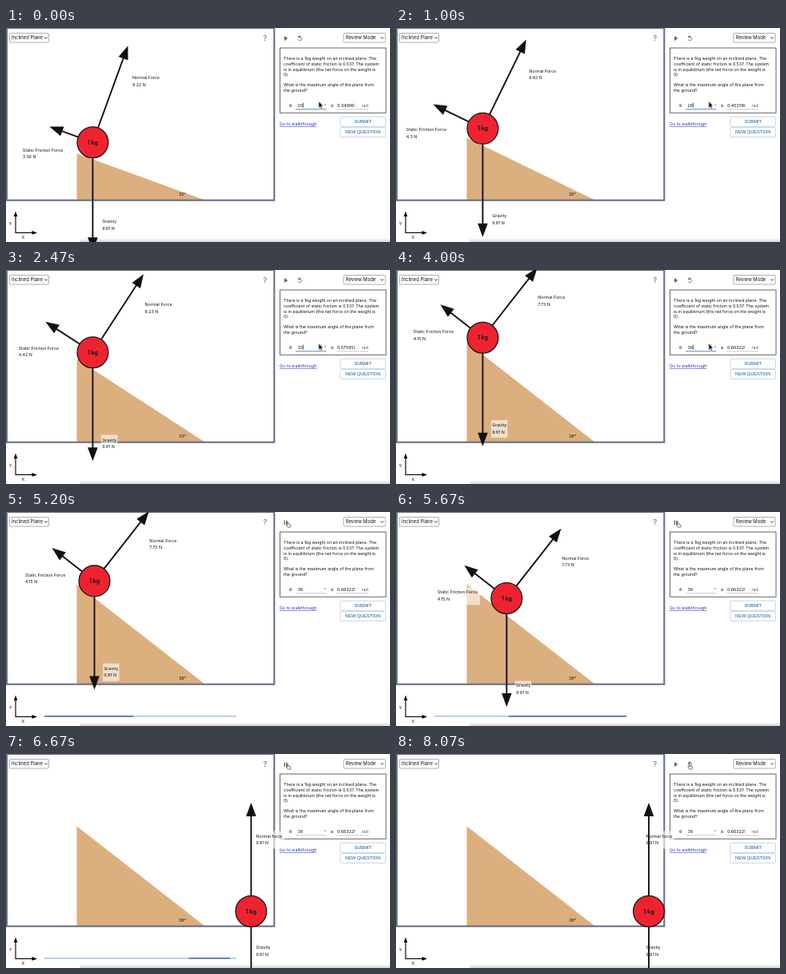
An HTML page for the animation above (8.27 s loop, 480 by 268 pixels).

```html
<!DOCTYPE html>
<html lang="en">
<head>
<meta charset="utf-8">
<title>Inclined plane</title>
<style>
  html, body { margin: 0; width: 100%; height: 100%; overflow: hidden; background: #fff; }
  svg { display: block; width: 100vw; height: 100vh; }
  text { font-family: Inter, "Liberation Sans", sans-serif; font-size: 5.35px; fill: #111; white-space: pre; }
  .question text { font-size: 5.28px; }
  .select text { font-size: 5.9px; }
  .button text { font-family: "Liberation Sans", Arial, sans-serif; fill: #3676b8; font-size: 5.65px;
    text-anchor: middle; stroke: #3676b8; stroke-width: .12px; }
  .button rect { fill: #fff; stroke: #b1c6dc; stroke-width: .7px; }
</style>
</head>
<body>
<svg id="stage" viewBox="0 0 480 268" preserveAspectRatio="none">
  <defs>
    <linearGradient id="shade" x1="0" y1="0" x2="0" y2="1">
      <stop offset="0" stop-color="#fff"/><stop offset="1" stop-color="#c8c8c8"/>
    </linearGradient>
    <clipPath id="radClip"><rect x="413" y="90" width="23.3" height="12"/></clipPath>
    <clipPath id="trackClip"><rect x="48" y="255" width="240" height="1.7"/></clipPath>
  </defs>
  <rect width="480" height="268" fill="#fff"/>
  <rect x="92" y="263" width="400" height="6.5" rx="4" fill="url(#shade)"/>
  <path id="ramp" fill="#dcaf7e"/>
  <rect x="1" y="0" width="334.3" height="215.7" fill="none" stroke="#657089" stroke-width="2.1"/>
  <text id="angle" x="216" y="210"></text>

  <g class="select" fill="#fff" stroke="#777" stroke-width=".6">
    <rect x="4.2" y="6.5" width="49.3" height="11.5" rx="1.5"/>
    <rect x="422" y="6.5" width="52.3" height="11.5" rx="1.5"/>
    <path d="M48 11.4l1.8 1.8 1.8-1.8M468.5 11.4l1.8 1.8 1.8-1.8" fill="none" stroke="#222" stroke-width=".9"/>
    <text x="7" y="14.4" stroke="none">Inclined Plane</text>
    <text x="424.8" y="14.4" stroke="none">Review Mode</text>
  </g>
  <text x="321.4" y="16.2" style="font-size:9px;fill:#4c586e">?</text>

  <path id="play" d="M348 10v6l4.3-3z" fill="#666"/>
  <path id="pause" d="M347.6 10.5h1.2v5.4h-1.2zM350.2 10.5h1.2v5.4h-1.2z" fill="#555"/>
  <g id="reset">
    <path d="M365.2 11.6a2.5 2.5 0 1 1-.3 2.6" fill="none" stroke="#666" stroke-width=".8"/>
    <path d="M367.6 9.1v4l-2.6-2z" fill="#666"/>
  </g>

  <g class="question">
    <rect x="342.5" y="25" width="132.5" height="81.3" fill="#fff" stroke="#555" stroke-width=".9"/>
    <text x="347" y="39.6">There is a 1kg weight on an inclined plane. The</text>
    <text x="347" y="46.6">coefficient of static friction is 0.537. The system</text>
    <text x="347" y="53.5">is in equilibrium (the net force on the weight is</text>
    <text x="347" y="60.4">0).</text>
    <text x="347" y="73">What is the maximum angle of the plane from</text>
    <text x="347" y="80">the ground?</text>
  </g>
  <text x="354" y="98.5">θ</text>
  <text id="degrees" x="364.5" y="98.5"></text>
  <path id="caret" d="M371.5 93.5v6.2" stroke="#111" stroke-width=".6"/>
  <path id="underline" d="M362 101.8h38.5"/>
  <g id="spinner">
    <rect x="389.5" y="92.5" width="5.5" height="8" rx="1" fill="#dcdcdc"/>
    <path d="M390.8 95.7l1.4-1.8 1.4 1.8zM390.8 97.5l1.4 1.8 1.4-1.8z" fill="#444"/>
  </g>
  <text x="398" y="98.5" style="fill:#555">°</text>
  <text x="406" y="98.5">≈</text>
  <text id="radians" x="414" y="98.5" clip-path="url(#radClip)"></text>
  <path d="M413 101.8h40" stroke="#999" stroke-width=".5"/>
  <text x="444.5" y="98.5" style="fill:#555">rad</text>

  <text x="342" y="122" style="fill:#2a2ad4;text-decoration:underline;text-decoration-thickness:.4px">Go to walkthrough</text>
  <g class="button">
    <rect x="418" y="111.3" width="56.5" height="12" rx="1.5"/>
    <rect x="418" y="124.5" width="56.5" height="12" rx="1.5"/>
    <text x="446.2" y="119.2">SUBMIT</text>
    <text x="446.2" y="132.4">NEW QUESTION</text>
  </g>

  <g stroke="#111" stroke-width="1.2">
    <path d="M12 233v23.4h22" fill="none"/>
    <path d="M12 229.5l2.3 6.5h-4.6zM39 256.4l-6.5 2.3v-4.6z" stroke="none"/>
    <text x="3.8" y="247" stroke="none">Y</text>
    <text x="19.6" y="263.5" stroke="none">X</text>
  </g>

  <g id="progress" clip-path="url(#trackClip)">
    <rect x="48" y="255" width="240" height="1.7" fill="#a9c3e3"/>
    <rect id="bar1" y="255" height="1.7" fill="#3c6cae"/>
    <rect id="bar2" y="255" height="1.7" fill="#3c6cae"/>
  </g>

  <g id="labels"></g>
  <g id="arrows"></g>
  <g id="ball">
    <circle r="19.4" fill="#ef2330" stroke="#151515" stroke-width="1.3"/>
    <text y="2.6" text-anchor="middle" style="font-size:7.2px;font-weight:600">1 kg</text>
  </g>

  <path id="pointer" d="M0 0v7.6l1.8-1.6 1.3 2.8 1.3-.6-1.3-2.7h2.4z" fill="#111" stroke="#fff" stroke-width=".5"/>
  <path id="hand" d="M0 .5q.6-.9 1.2 0v2.6l2.6.6q.9.3.7 1.2l-.5 2.2h-3.1l-1.9-2.4q.1-.8 1-.3z" fill="#fff" stroke="#222" stroke-width=".6"/>
</svg>
<script>
const LOOP = 8270, G = 9.81, MU = 0.537;
const PLAY = 4935, SLIDE = 5030, STOP = 7200;
const RAMP = { left: 88.5, right: 248.5, base: 215.5 };
const START_X = 108.4, FLOOR_Y = 197, WALL_X = 316;
const ACCEL = 72.8, FLOOR_SPEED = 230;
const clicks = [130, 270, 400, 530, 670, 800, 1070, 1270, 1470, 1670,
  1870, 2000, 2200, 2530, 2800, 3070, 3400, 3600];
const cursorPath = [[0, 391, 92.3], [4070, 391, 92.3], [4750, 351.5, 12],
  [7260, 351.5, 12], [7800, 366, 12], [LOOP, 366, 12]];

const $ = id => document.getElementById(id);
const set = (el, attrs) => { for (const k in attrs) el.setAttribute(k, attrs[k]); };
const show = (el, on) => el.setAttribute('visibility', on ? 'visible' : 'hidden');
function add(parent, tag, attrs = {}) {
  const el = document.createElementNS('http://www.w3.org/2000/svg', tag);
  set(el, attrs);
  return parent.appendChild(el);
}

function makeForce(boxWidth) {
  const shaft = add($('arrows'), 'path', { stroke: '#111', 'stroke-width': 1.9 });
  const head = add($('arrows'), 'path', { d: 'M0 0l-17 6.3v-12.6z', fill: '#111' });
  const label = add($('labels'), 'g');
  add(label, 'rect', { x: -1.3, y: -6, width: boxWidth, height: 22, rx: 1, fill: '#fff', 'fill-opacity': .6 });
  const name = add(label, 'text', { y: 2 });
  const value = add(label, 'text', { y: 10.5 });
  return { shaft, head, label, name, value };
}
const normal = makeForce(37), friction = makeForce(54.5), gravity = makeForce(20.5);

// Direction is in degrees, clockwise from the right.
function drawForce(f, x, y, title, newtons, dir, place) {
  const len = 16.8 + 12.15 * newtons, a = dir * Math.PI / 180;
  const dx = len * Math.cos(a), dy = len * Math.sin(a);
  set(f.shaft, { d: `M${x} ${y}l${dx * (1 - 12 / len)} ${dy * (1 - 12 / len)}` });
  set(f.head, { transform: `translate(${x + dx} ${y + dy}) rotate(${dir})` });
  const [lx, ly] = place(dx, dy);
  set(f.label, { transform: `translate(${Math.min(x + lx, 312.5)} ${Math.min(y + ly, 242)})` });
  f.name.textContent = title;
  f.value.textContent = +newtons.toFixed(2) + ' N';
}

function bezier(x1, y1, x2, y2) {
  const at = (p, q, s) => 3 * (1 - s) ** 2 * s * p + 3 * (1 - s) * s * s * q + s ** 3;
  return x => {
    if (x <= 0 || x >= 1) return Math.max(0, Math.min(1, x));
    let lo = 0, hi = 1;
    for (let i = 0; i < 24; i++) {
      const mid = (lo + hi) / 2;
      if (at(x1, x2, mid) < x) lo = mid; else hi = mid;
    }
    return at(y1, y2, lo);
  };
}
const ease1 = bezier(.65, .815, .735, .395), ease2 = bezier(.165, .84, .44, 1);

function drawBar(el, ms, ease, left, right) {
  const k = ms < 0 ? 0 : ease((ms % 2100) / 1260);
  const mix = ([a, b]) => 2.4 * (a + (b - a) * k);
  const from = mix(left), to = 240 - mix(right);
  set(el, { x: 48 + from, width: Math.max(0, to - from) });
}

function ballAt(t, tan) {
  const y0 = 194.2 - (RAMP.right - START_X) * tan;
  const s = Math.max(0, t - SLIDE) / 1000;
  const drop = (FLOOR_Y - y0) / tan;
  const landing = Math.sqrt(drop / ACCEL);
  if (s < landing) {
    const dx = ACCEL * s * s;
    return { x: START_X + dx, y: y0 + dx * tan, floor: false };
  }
  const x = START_X + drop + FLOOR_SPEED * (s - landing);
  return { x: Math.min(WALL_X, x), y: FLOOR_Y, floor: true };
}

function drawCursor(t) {
  const i = cursorPath.findIndex(p => p[0] > t);
  const [t0, x0, y0] = cursorPath[i - 1], [t1, x1, y1] = cursorPath[i];
  const u = (t - t0) / (t1 - t0), k = u * u * (3 - 2 * u);
  const x = x0 + (x1 - x0) * k, y = y0 + (y1 - y0) * k;
  const overButton = y < 18;
  show($('hand'), overButton);
  show($('pointer'), !overButton);
  set($(overButton ? 'hand' : 'pointer'), { transform: `translate(${x} ${y})` });
  show($('spinner'), y > 88);
}

function draw(t) {
  const deg = 20 + clicks.filter(c => c <= t).length;
  const rad = deg * Math.PI / 180, tan = Math.tan(rad);
  const running = t >= PLAY && t < STOP, focused = t < PLAY - 100;

  set($('ramp'), { d: `M${RAMP.left} ${RAMP.base}V${RAMP.base - (RAMP.right - RAMP.left) * tan}L${RAMP.right} ${RAMP.base}z` });
  $('angle').textContent = deg + '°';
  $('degrees').textContent = deg;
  $('radians').textContent = rad.toFixed(6);
  show($('caret'), focused);
  set($('underline'), { stroke: focused ? '#4f7dac' : '#999', 'stroke-width': focused ? .9 : .5 });

  const { x, y, floor } = ballAt(t, tan);
  set($('ball'), { transform: `translate(${x} ${y})` });
  const push = floor ? G : G * Math.cos(rad);
  drawForce(normal, x, y, floor ? 'Normal force' : 'Normal Force', push,
    floor ? -90 : deg - 90, (dx, dy) => [14.3 + .8 * dx, 28 + .9 * dy]);
  drawForce(friction, x, y, 'Static Friction Force', Math.min(G * Math.sin(rad), MU * push),
    deg + 180, (dx, dy) => [dx - 33.6, 25.4 + .8 * dy]);
  drawForce(gravity, x, y, 'Gravity', G, 90, () => [11.8, 109.3]);
  for (const part of [friction.shaft, friction.head, friction.label]) show(part, !floor);

  show($('play'), !running);
  show($('reset'), !running);
  show($('pause'), running);
  show($('progress'), running);
  drawBar($('bar1'), t - PLAY, ease1, [-35, 100], [100, -90]);
  drawBar($('bar2'), t - PLAY - 1150, ease2, [-200, 107], [100, -8]);
  drawCursor(t);
}

const began = performance.now();
function tick() {
  draw((performance.now() - began) % LOOP);
  requestAnimationFrame(tick);
}
tick();
</script>
</body>
</html>
```
